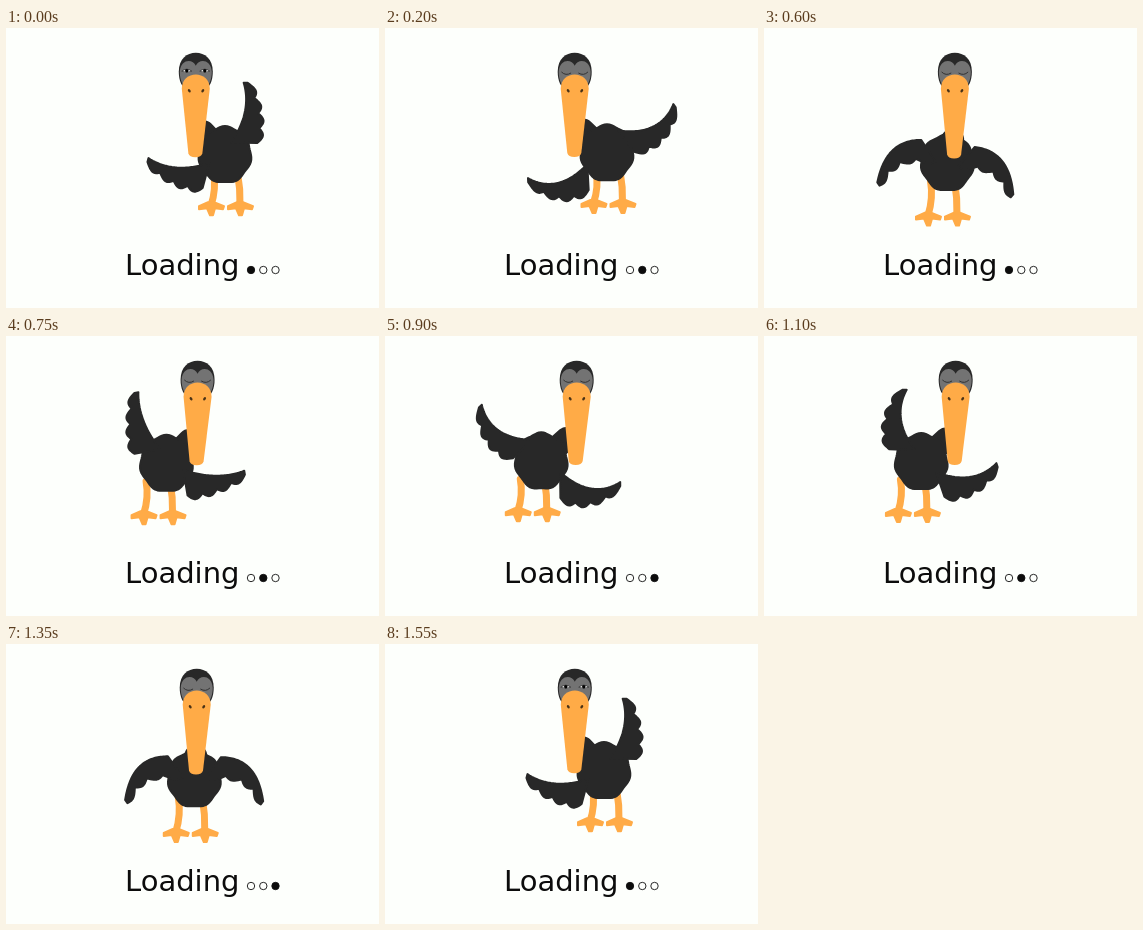
These frames come from a looping animation (373x280 px, 1.6 s). An HTML page:

```html
<!DOCTYPE html>
<html lang="en">
<head>
<meta charset="utf-8">
<title>Loading</title>
<style>
  html, body { margin: 0; width: 100%; height: 100%; overflow: hidden; background: #fdfffc; }
  svg { display: block; width: 100vw; height: 100vh; }
  text { font: 29px "DejaVu Sans", sans-serif; fill: #0c0c0c; }
  .dark { fill: #282828; }
  .gold { fill: #ffab47; }
  #plumage { stroke: #282828; stroke-width: 2; stroke-linejoin: round; }
  #neck { stroke-width: 23; stroke-linecap: round; }
  #legs { fill: none; stroke: #ffab47; stroke-width: 7; stroke-linecap: round; }
  #feet { stroke: #ffab47; stroke-width: 2; stroke-linejoin: round; }
  .lid { fill: none; stroke: #333; stroke-linecap: round; }
  #dots circle { stroke: #111; stroke-width: .9; fill: none; }
</style>
</head>
<body>
<svg viewBox="0 0 373 280">
  <path id="legs"/>
  <path id="feet" class="gold"/>
  <g id="plumage" class="dark">
    <path id="neck"/>
    <path id="belly"/>
    <path id="leftWing"/>
    <path id="rightWing"/>
  </g>
  <g id="head">
    <path class="dark" d="M-17 19C-17 6-9 0 0 0S17 6 17 19C17 28 14 34 9 38H-9C-14 34-17 28-17 19Z"/>
    <path fill="#737373" d="M0 13C-3 6-15 6-16 19C-16 27-13 33-9 37H9C13 33 16 27 16 19C15 6 3 6 0 13Z"/>
    <path id="shut" class="lid" d="M-13 19.500Q-9 23.500-4 20.500M4 20.500Q9 23.500 13 19.500"/>
    <g id="open">
      <path fill="#eee" stroke="#222" stroke-width=".7" d="M-14 18.500Q-9 14.500-4 18.500Q-9 21-14 18.500ZM4 18.500Q9 14.500 14 18.500Q9 21 4 18.500Z"/>
      <circle cx="-9" cy="18" r="1.700"/>
      <circle cx="9" cy="18" r="1.700"/>
    </g>
  </g>
  <path id="bill" class="gold"/>
  <g id="nose" fill="#4a3216">
    <ellipse cx="-6.500" cy="38" rx="1.200" ry="1.900" transform="rotate(-35 -6.500 38)"/>
    <ellipse cx="7" cy="38" rx="1.200" ry="1.900" transform="rotate(35 7 38)"/>
  </g>
  <text x="119" y="246.500">Loading</text>
  <g id="dots">
    <circle cx="245" cy="242" r="3.700"/>
    <circle cx="257.300" cy="242" r="3.700"/>
    <circle cx="269.500" cy="242" r="3.700"/>
  </g>
</svg>
<script>
const $ = id => document.getElementById(id);
const LOOP = 1600, STEP = 50, SWAY = 1550, DOT = 157, TAU = 2 * Math.PI;

// Cosine that lingers at both ends.
const swing = a => Math.tanh(1.8 * Math.cos(a)) / Math.tanh(1.8);

const set = (id, d) => $(id).setAttribute("d", d);
const shape = pts => "M" + pts.map(p => p.map(v => v.toFixed(2))).join("L") + "Z";

// Egg with a slightly wavy rim.
function belly(x, y) {
  const pts = [];
  for (let a = 0; a < TAU; a += TAU / 72) {
    const r = 1 + 0.03 * Math.sin(7 * a);
    pts.push([x + 26 * r * Math.cos(a), y + 28 * r * Math.sin(a)]);
  }
  return shape(pts);
}

// side: 1 right, -1 left. lift: -1 trailing, 0 drooping, 1 raised.
function wing(side, x, y, lift, flap) {
  const up = Math.max(lift, 0), low = Math.max(-lift, 0);
  const angle = (-35 + 30 * lift + 77 * lift * lift + (36 * up + 15 * low) * flap) * TAU / 360;
  const bow = 25 * lift * lift - 14, length = 60;
  const cos = Math.cos(angle), sin = Math.sin(angle);
  const at = (u, off) => {
    const along = u * length, down = 4 * u * (1 - u) * bow + off;
    return [
      x + side * (19 + along * cos + down * sin),
      y - (12 - 36 * low + along * sin - down * cos)
    ];
  };
  const lead = [], trail = [];
  for (let i = 0; i <= 48; i++) {
    const u = i / 48, w = 2 + 11 * (1 - u) ** 1.2;
    lead.push(at(u, -w));
    trail.unshift(at(u, w + 4.5 * Math.abs(Math.sin(2 * TAU * u))));
  }
  return shape([...lead, ...trail]);
}

const foot = (x, y) =>
  `M${x - 3} ${y - 3}l-9 4l0 3l8-1l3 7l3 0l2-7l8 1l1-3l-10-4Z`;

const leg = (x, top, ankleX, ankleY) =>
  `M${x} ${top}Q${x + 3} ${(top + ankleY) / 2} ${ankleX} ${ankleY}`;

const billPath = (x, y, tx, ty) =>
  `M${x - 14} ${y + 36}C${x - 14} ${y + 17} ${x + 14} ${y + 17} ${x + 14} ${y + 36}` +
  `L${tx + 7} ${ty - 4}Q${tx + 6} ${ty} ${tx} ${ty}Q${tx - 6} ${ty} ${tx - 7} ${ty - 4}Z`;

const dots = [...$("dots").children];

function draw(t) {
  const sway = swing(TAU * (t - 190) / SWAY);
  const flap = swing(4 * TAU * t / SWAY);
  const rise = sway * sway;

  const x = 189 + 33 * sway, y = 135 - 10 * rise;
  set("belly", belly(x, y));
  set("neck", `M${x} ${y}L${190 + 8 * sway} ${y - 23}`);
  set("rightWing", wing(1, x, y, sway, flap));
  set("leftWing", wing(-1, x, y, -sway, flap));

  const stance = 185 + 38 * sway, ground = 188 - 13 * rise;
  const sides = [-1, 1];
  set("legs", sides.map(s => leg(stance + 12 * s, y + 18, stance + 14.5 * s, ground)).join(""));
  set("feet", sides.map(s => foot(stance + 14.5 * s, ground)).join(""));

  const headX = 190.7 - sway, top = 24.7;
  const shift = `translate(${headX} ${top})`;
  $("head").setAttribute("transform", shift);
  $("nose").setAttribute("transform", shift);
  set("bill", billPath(headX, top, 190 - 0.7 * sway, 130.5 - 1.5 * rise));

  const awake = t < 150 || t >= 1500;
  $("open").style.display = awake ? "" : "none";
  $("shut").style.display = awake ? "none" : "";

  const on = Math.floor(t % (3 * DOT - 1) / DOT);
  dots.forEach((dot, i) => { dot.style.fill = i === on ? "#0c0c0c" : "none"; });
}

const start = performance.now();
function tick() {
  const t = (performance.now() - start) % LOOP;
  draw(Math.floor(t / STEP) * STEP % SWAY);
  requestAnimationFrame(tick);
}
tick();
</script>
</body>
</html>
```
